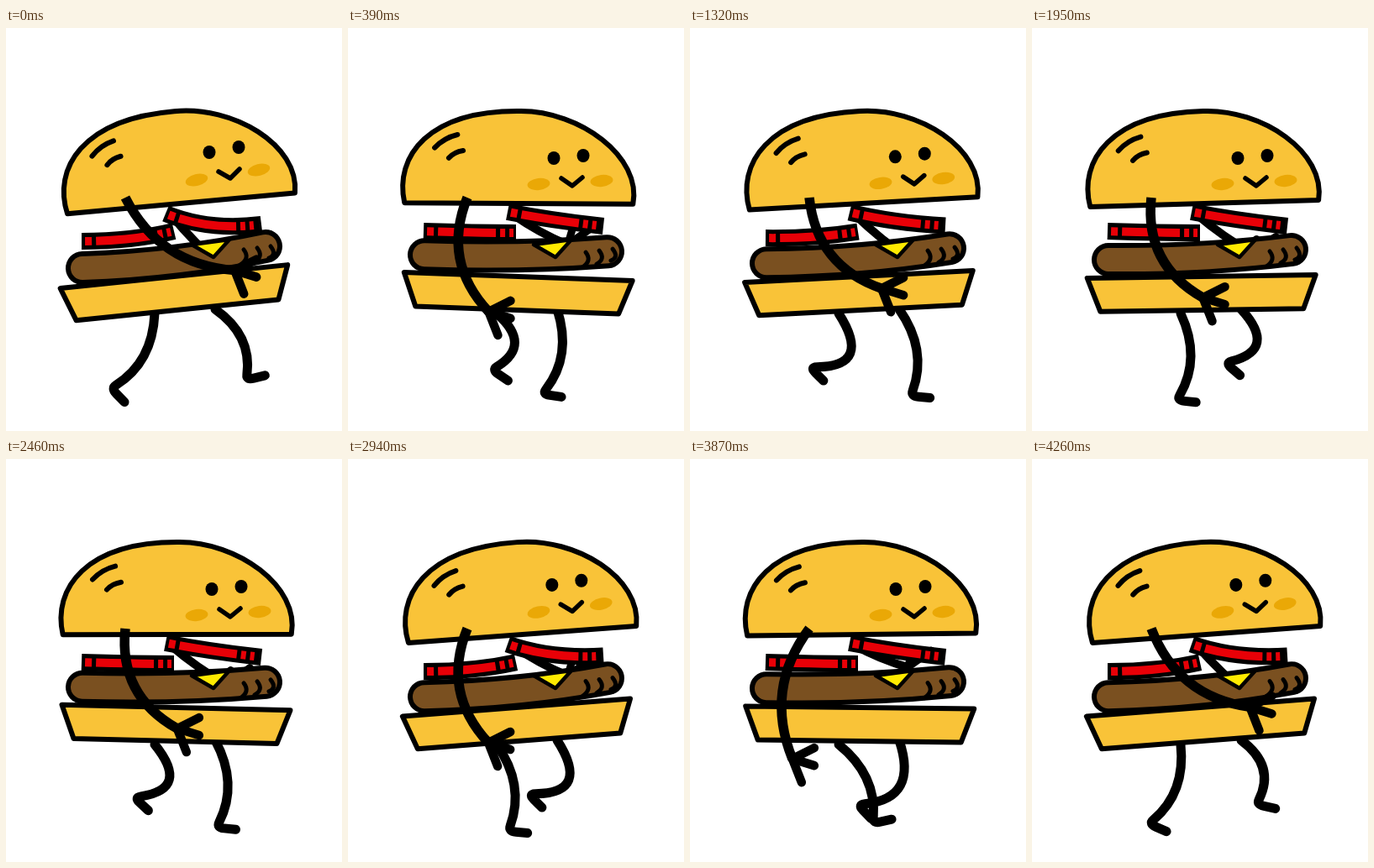
Write an HTML page with a canvas that moves like this. It is 400 by 480 pixels and loops after 4290 ms.

```html
<!DOCTYPE html>
<html lang="en">
<head>
<meta charset="utf-8">
<title>Walking burger</title>
<style>
  html, body { margin: 0; width: 100%; height: 100%; overflow: hidden; background: #fff; }
  canvas { display: block; }
</style>
</head>
<body>
<canvas id="stage" width="400" height="480"></canvas>
<script>
const ctx = document.getElementById('stage').getContext('2d');
const LOOP = 4290, STEP = 30, STRIDE = 1080, SWAY = 720;
const BUN = '#f9c338', PATTY = '#7a5020', RED = '#e80007', CHEESE = '#ffea00', BLUSH = '#eaa806';
const { PI, sin, cos, abs, min, hypot } = Math;
const rad = deg => deg * PI / 180;

function stroke(path, width, color = '#000', cap = 'round') {
  ctx.lineCap = cap;
  ctx.lineJoin = 'round';
  ctx.lineWidth = width;
  ctx.strokeStyle = color;
  ctx.stroke(path);
}

function shape(path, fill, width) {
  ctx.fillStyle = fill;
  ctx.fill(path);
  stroke(path, width);
}

function curve(x0, y0, cx, cy, x1, y1) {
  const path = new Path2D();
  path.moveTo(x0, y0);
  path.quadraticCurveTo(cx, cy, x1, y1);
  return path;
}

function line(x0, y0, x1, y1) {
  return curve(x0, y0, x0, y0, x1, y1);
}

// Control point beside the middle of a limb.
function bendPoint(x0, y0, x1, y1, bend) {
  const dx = x1 - x0, dy = y1 - y0, k = bend / hypot(dx, dy);
  return [x0 + dx / 2 - dy * k, y0 + dy / 2 + dx * k];
}

function tilted(x, y, degrees, paint) {
  ctx.save();
  ctx.translate(x, y);
  ctx.rotate(rad(degrees));
  paint();
  ctx.restore();
}

function oval(x, y, rx, ry, turn = 0, color = '#000') {
  ctx.fillStyle = color;
  ctx.beginPath();
  ctx.ellipse(x, y, rx, ry, turn, 0, 2 * PI);
  ctx.fill();
}

// The foot speeds up while swinging forward, then slides back on the ground.
function leg(x, y, phase) {
  const lift = 0.53;
  let hx, hy, turn, bend = 27;
  if (phase < lift) {
    const s = phase / lift;
    hx = x - 52 + 100 * s * s;
    hy = y + 89 - 26 * sin(PI * s);
    turn = 0.8 - 1.4 * s ** 5;
    bend += 270 * s * (1 - s) ** 2;
  } else {
    const q = (phase - lift) / (1 - lift);
    hx = x + 48 - 100 * q ** 1.2;
    hy = y + 89 + 15 * sin(PI * q);
    turn = 0.1 + 0.7 * (2 * q - 1) ** 3;
  }
  const [kx, ky] = bendPoint(x, y, hx, hy, -bend);
  const tx = hx + 23 * cos(turn), ty = hy + 23 * sin(turn);
  const path = curve(x, y, kx, ky, hx + (kx - hx) * 0.12, hy + (ky - hy) * 0.12);
  path.quadraticCurveTo(hx, hy, hx + (tx - hx) * 0.4, hy + (ty - hy) * 0.4);
  path.lineTo(tx, ty);
  stroke(path, 11);
}

function arm(x, y, degrees, length, bend, width, fingers) {
  const px = x + length * cos(rad(degrees)), py = y + length * sin(rad(degrees));
  stroke(curve(x, y, ...bendPoint(x, y, px, py, bend), px, py), width, '#000', 'butt');
  for (const [fx, fy] of fingers) stroke(line(px, py, px + fx, py + fy), width - 1);
}

// Slice seen from the side: red dashes over a black band.
function tomato(path) {
  stroke(path, 20, '#000', 'butt');
  ctx.setLineDash([0, 4, 8, 5, 69, 5, 6, 5, 5, 99]);
  stroke(path, 10, RED, 'butt');
  ctx.setLineDash([]);
}

function patty(u) {
  const path = curve(91, 286 - 10 * u, 205, 282 - 5 * u, 309, 260 + 4 * u);
  stroke(path, 40);
  stroke(path, 28, PATTY);
  for (let i = 0; i < 3; i++) {
    const x = 283 + 16 * i, y = 264 - 2 * i + 2 * u;
    stroke(curve(x, y, x + 8, y + 10, x - 4 + i, y + 18 - 2 * i), 5);
  }
}

function topBun(u) {
  tilted(205, 155, 3.57 * u - 4.83, () => {
    shape(new Path2D('M-137 55C-150 0-110-56 0-56C70-57 145-4 135 53Z'), BUN, 6);
    stroke(curve(-102, -11, -91, -23, -75, -27), 6);
    stroke(curve(-85, 1, -79, -6, -68, -8), 6);
  });
}

function face(v) {
  const turn = 0.12 * v - 0.24;
  oval(242 + 3 * v, 148 + 7 * v, 7.5, 8);
  oval(277 + 3 * v, 142 + 10 * v, 7.5, 8);
  oval(227, 181 + 5 * v, 13.5, 7, turn, BLUSH);
  oval(301 + v, 169 + 13 * v, 13.5, 7, turn, BLUSH);
  const mouth = line(253 + v, 171 + 8 * v, 267, 179 + 9 * v);
  mouth.lineTo(278 + v, 168 + 10 * v);
  stroke(mouth, 5.5);
}

function draw(time) {
  const phase = time / STRIDE % 1;
  const swing = cos(2 * PI * (phase - 0.042));
  const u = abs((time + SWAY / 2) % SWAY - SWAY / 2) / 210;
  const w = min(1, u * 1.2), v = w * w * (3 - 2 * w), settle = min(1, u) ** 2;

  ctx.fillStyle = '#fff';
  ctx.fillRect(0, 0, 400, 480);

  leg(177, 340, phase);
  leg(249, 335, (phase + 0.5) % 1);
  arm(196, 222, 34 + 12 * swing, 80 + 12 * swing, 4, 10, [[5, -17], [28, -20]]);
  topBun(u);
  face(v);
  tomato(curve(90, 254 - 12 * settle, 150, 254 - 10 * settle, 200, 242 + 2 * settle));
  tomato(curve(190, 221 - 2 * v, 241, 242 - 13 * v, 304, 234 + 2 * v));
  patty(u);
  shape(new Path2D('M221 258L266 252L247 273Z'), CHEESE, 4.5);
  tilted(202, 316, 5.1 * u - 5.9, () => shape(new Path2D('M-136-20H136L121 20H-121Z'), BUN, 6));
  arm(142, 202, 65.5 - 33 * swing, 134 + 24 * swing ** 2, 44, 11.5, [[26, -13], [26, 8], [11, 28]]);
}

function tick() {
  const now = performance.now() % LOOP;
  draw(Math.floor(now / STEP) * STEP);
  requestAnimationFrame(tick);
}
tick();
</script>
</body>
</html>
```
